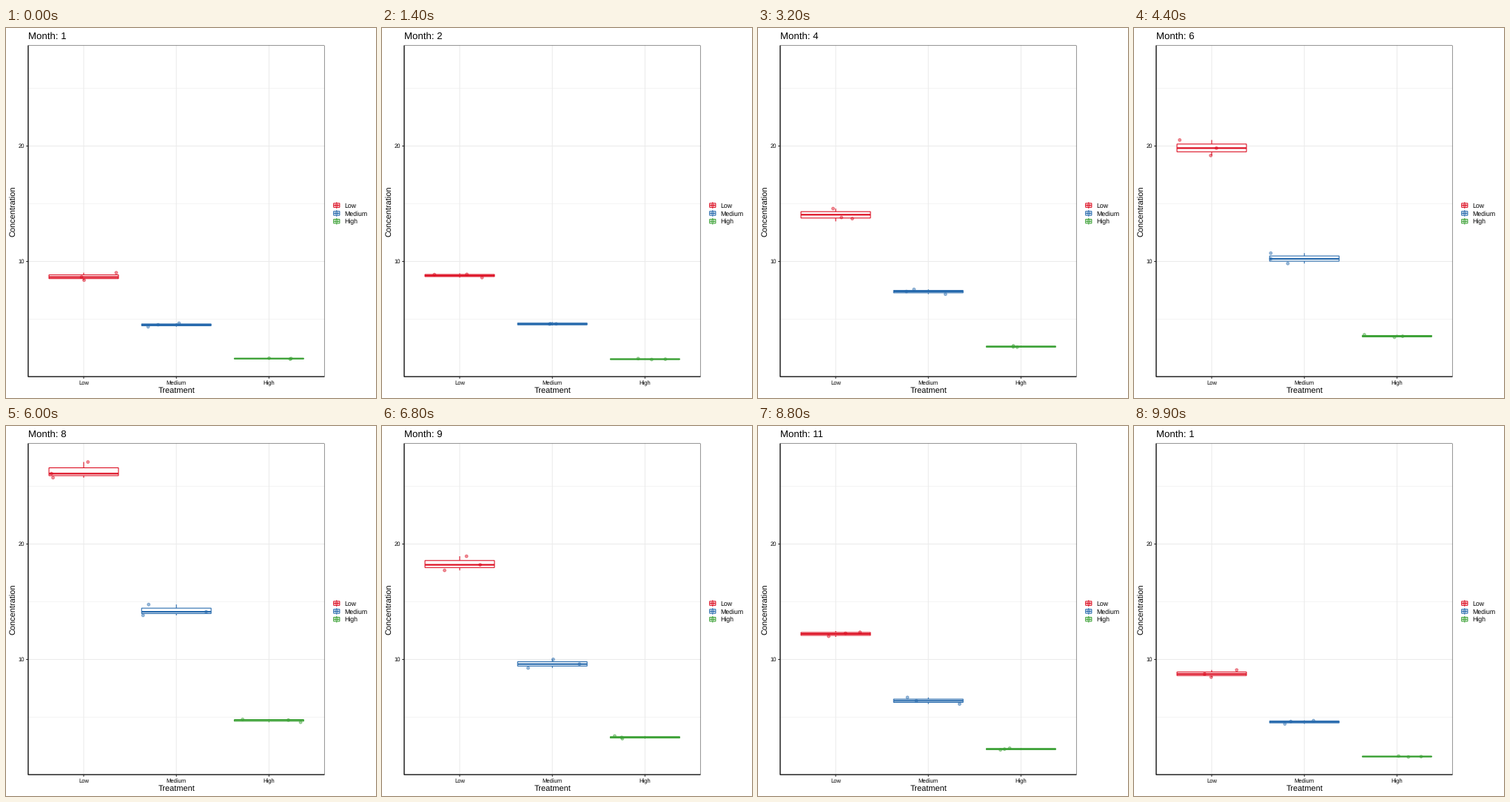
Animation, 500 px wide and 500 px high, one loop 10000 ms. Source, as a matplotlib script:

```python
import random

import matplotlib.pyplot as plt
from matplotlib.animation import FuncAnimation
from matplotlib.patches import Circle, Rectangle

plt.rcParams["font.family"] = "Liberation Sans"
plt.rcParams["text.hinting"] = "none"
plt.rcParams["path.snap"] = False

SIZE, DPI, FRAMES = 500, 100, 100
PT = 72 / DPI
LEFT, RIGHT, TOP, BOTTOM = 29.9, 430.5, 23.5, 471.2
STEP = (RIGHT - LEFT) / 3.2
HALF = 0.375 * STEP
THIN, THICK = 1.07, 2.13
GRID = "#ebebeb"

# Colour and median concentration by month for each treatment
TREATMENTS = {
    "Low": ("#dc0a1e", [8.65, 7.9, 9.66, 12, 16.1, 19.82,
                        24.4, 26.1, 18.2, 17, 13, 9.1]),
    "Medium": ("#2468ac", [4.52, 4.1, 5.05, 6.35, 8.45, 10.23,
                           13, 14.13, 9.6, 8.92, 6.8, 4.9]),
    "High": ("#3ba135", [1.59, 1.4, 1.67, 2.2, 3.05, 3.52,
                         4.5, 4.75, 3.25, 3.12, 2.4, 1.61]),
}


def y_at(value):
    return 471.5 - 15.6 * value


def mix(a, b, t):
    return a + (b - a) * t


def scatter(rng, x, median):
    """Three jittered samples: one below, one at and one above the median."""
    values = [median * (1 - rng.uniform(0.01, 0.05)), median,
              median * (1 + rng.uniform(0.01, 0.05))]
    rng.shuffle(values)
    return [(x + rng.uniform(-0.38, 0.38) * STEP, y_at(v)) for v in values]


def box_stats(points):
    high, mid, low = sorted(y for _, y in points)
    return high, (high + mid) / 2, mid, (mid + low) / 2, low


def state_at(frame):
    """Previous month, next month and progress between them."""
    start = 2
    for month in range(1, 13):
        steps = 6 if month <= 5 else 5
        if frame < start + steps:
            return month, month % 12 + 1, max(0, frame - start) / steps
        start += steps + 3
    return 12, 1, 1


fig = plt.figure(figsize=(SIZE / DPI, SIZE / DPI), dpi=DPI, facecolor="white")
ax = fig.add_axes([0, 0, 1, 1])
ax.set(xlim=(0, SIZE), ylim=(SIZE, 0))
ax.axis("off")


def line(xs, ys, color, width, z=1):
    return ax.plot(xs, ys, color=color, lw=width * PT, zorder=z,
                   solid_capstyle="butt")[0]


def label(x, y, s, size, ha="left", **kw):
    return ax.text(x, y, s, fontsize=size * PT, ha=ha, va="baseline",
                   color="black", rotation_mode="anchor", **kw)


def rect(x, y, w, h, color, z, fill="white", width=THIN):
    return ax.add_patch(Rectangle((x, y), w, h, fc=fill, ec=color,
                                  lw=width * PT, zorder=z))


def dot(x, y, color):
    fill = Circle((x, y), 1.95, fc=color, ec="none", alpha=0.45, zorder=5)
    ring = Circle((x, y), 1.95, fc="none", ec=color, alpha=0.45,
                  lw=0.94 * PT, zorder=5)
    return [ax.add_patch(fill), ax.add_patch(ring)]


class Box:
    def __init__(self, x, color, medians):
        rng = random.Random(x)
        self.months = [scatter(rng, x, m) for m in medians]
        self.whisks = [line([x, x], [0, 0], color, THIN, 2) for _ in range(2)]
        self.body = rect(x - HALF, 0, 2 * HALF, 1, color, 3)
        self.median = line([x - HALF, x + HALF], [0, 0], color, THICK, 4)
        self.dots = [dot(x, 0, color) for _ in range(3)]

    def move(self, prev, nxt, t):
        a, b = self.months[prev - 1], self.months[nxt - 1]
        high, q3, mid, q1, low = (
            mix(p, q, t) for p, q in zip(box_stats(a), box_stats(b)))
        self.whisks[0].set_ydata([high, q3])
        self.whisks[1].set_ydata([q1, low])
        self.body.set_y(q3)
        self.body.set_height(q1 - q3)
        self.median.set_ydata([mid, mid])
        for parts, p, q in zip(self.dots, a, b):
            for part in parts:
                part.center = mix(p[0], q[0], t), mix(p[1], q[1], t)


def legend_key(x, y, name, color):
    line([x, x], [y - 4.3, y + 4.3], color, THIN, 2)
    rect(x - 4.05, y - 2.7, 8.1, 5.4, color, 3)
    line([x - 4.05, x + 4.05], [y, y], color, THIN, 4)
    dot(x, y, color)
    label(x + 10.9, y + 3.2, name, 8.8)


# Grid, axes and titles
for value in (5, 15, 25):
    line([LEFT, RIGHT], [y_at(value)] * 2, GRID, THIN / 2)
for value in (10, 20):
    y = y_at(value)
    line([LEFT, RIGHT], [y, y], GRID, THIN)
    line([LEFT - 2.75, LEFT], [y, y], "#333333", THIN)
    label(24.6, y + 2.8, str(value), 7.6, "right")
line([LEFT, LEFT, RIGHT], [TOP, BOTTOM, BOTTOM], "black", THIN, 9)
# The panel clips the outer half of its border
rect(LEFT + 0.27, TOP + 0.27, RIGHT - LEFT - 0.54, BOTTOM - TOP - 0.54,
     "#333333", 8, "none", THIN / 2)
label((LEFT + RIGHT) / 2, 493, "Treatment", 11, "center")
label(13.3, (TOP + BOTTOM) / 2, "Concentration", 11, "center", rotation=90)
title = label(29.5, 15, "", 13.2)

boxes = []
for i, (name, (color, medians)) in enumerate(TREATMENTS.items()):
    x = LEFT + (0.6 + i) * STEP
    line([x, x], [TOP, BOTTOM], GRID, THIN)
    line([x, x], [BOTTOM, BOTTOM + 2.75], "#333333", THIN)
    label(x, 482, name, 7.6, "center")
    legend_key(446.8, 239.6 + 10.8 * i, name, color)
    boxes.append(Box(x, color, medians))


def draw(frame):
    prev, nxt, t = state_at(frame)
    title.set_text(f"Month: {nxt if t > 0.5 else prev}")
    for box in boxes:
        box.move(prev, nxt, t)
    return []


anim = FuncAnimation(fig, draw, frames=FRAMES, interval=100, repeat=True,
                     repeat_delay=0, init_func=lambda: draw(0), blit=False)
plt.show()
```
